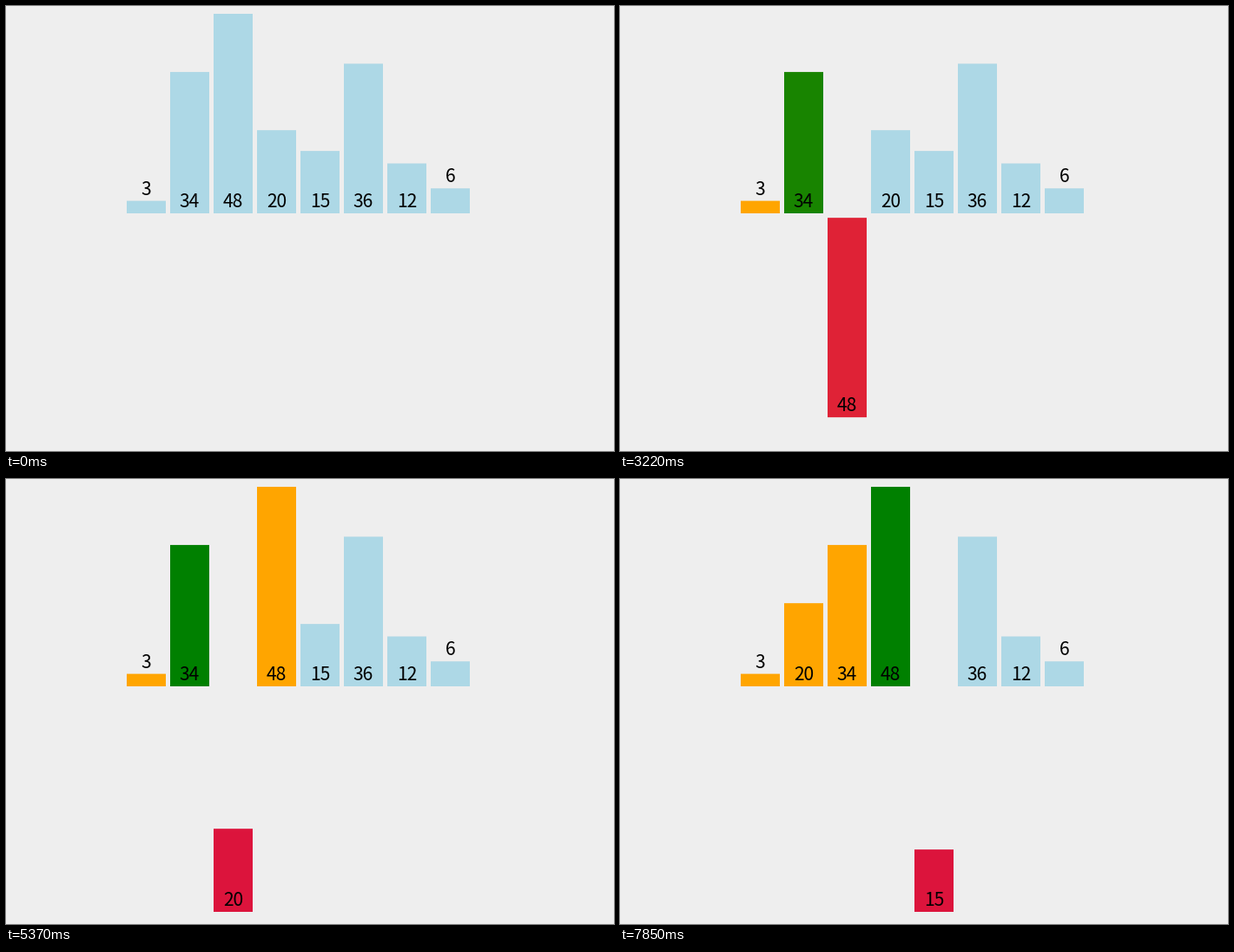
Recreate the animation shown at these times as a matplotlib script. Size 700x513 px, loop 8000 ms.

```python
from itertools import islice

import matplotlib.pyplot as plt
import numpy as np
from matplotlib.animation import FuncAnimation
from matplotlib.colors import to_rgb
from matplotlib.patches import Rectangle

W, H, DPI = 700, 513, 64
LOOP, STEP = 8000, 20

# Timing in ms: sort steps follow a steady beat, the picture refreshes in ticks.
FIRST, BEAT, DURATION = 139, 496.3, 250
TICK_START, TICK = 240, 77.6

VALUES = [3, 34, 48, 20, 15, 36, 12, 6]
LEFT, PITCH, BAR_W = 139, 50, 45
UPPER, LOWER = 239, 499
SCALE = 230 / max(VALUES)
LABEL_GAP = 7

PLAIN, KEY, CHECK, DONE = map(to_rgb, ["lightblue", "crimson", "green", "orange"])


def insertion_sort(values):
    """Yield the look of all bars after each step: x, base and colour per row."""
    state = np.array([[LEFT + PITCH * i, UPPER, *PLAIN] for i in range(len(values))])
    order = list(range(len(values)))
    yield state.copy()
    state[0, 2:] = DONE
    yield state.copy()
    for i in range(1, len(values)):
        key = order[i]
        state[key, 1:] = LOWER, *KEY
        yield state.copy()
        for j in range(i - 1, -1, -1):
            other = order[j]
            state[other, 2:] = CHECK
            yield state.copy()
            if values[other] <= values[key]:
                break
            order[j], order[j + 1] = key, other
            state[[key, other], 0] = state[[other, key], 0]
            yield state.copy()
            state[other, 2:] = DONE
        state[other, 2:] = DONE
        state[key, 1:] = UPPER, *DONE
        yield state.copy()


def ease(t):
    t = min(max(t, 0), 1)
    return 4 * t**3 if t < 0.5 else 1 - 4 * (1 - t) ** 3


def state_at(time):
    time = TICK_START + (time - TICK_START) // TICK * TICK
    k = max(0, int((time - FIRST) // BEAT))
    p = ease((time - FIRST - k * BEAT) / DURATION)
    return STATES[k] + (STATES[k + 1] - STATES[k]) * p


STATES = list(islice(insertion_sort(VALUES), int((LOOP - FIRST) // BEAT) + 2))

fig = plt.figure(figsize=(W / DPI, H / DPI), dpi=DPI, facecolor="#eeeeee")
ax = fig.add_axes([0, 0, 1, 1])
ax.set(xlim=(0, W), ylim=(H, 0))
ax.axis("off")

bars = [
    ax.add_patch(Rectangle((0, 0), BAR_W, v * SCALE, linewidth=0, snap=False))
    for v in VALUES
]
labels = [
    ax.text(0, 0, str(v), ha="center", va="baseline", color="black",
            family="Noto Sans CJK JP", size=21 * 72 / DPI)
    for v in VALUES
]


def draw(n):
    for bar, label, (x, base, *rgb) in zip(bars, labels, state_at((n + 0.5) * STEP)):
        height = bar.get_height()
        bar.set_xy((x, base - height))
        bar.set_facecolor(np.clip(rgb, 0, 1))
        # Short bars carry their number on top.
        foot = base if height > 40 else base - height
        label.set_position((x + BAR_W / 2, foot - LABEL_GAP))
    return bars + labels


anim = FuncAnimation(fig, draw, frames=LOOP // STEP, interval=STEP,
                     repeat=True, repeat_delay=0, blit=False)
plt.show()
```
